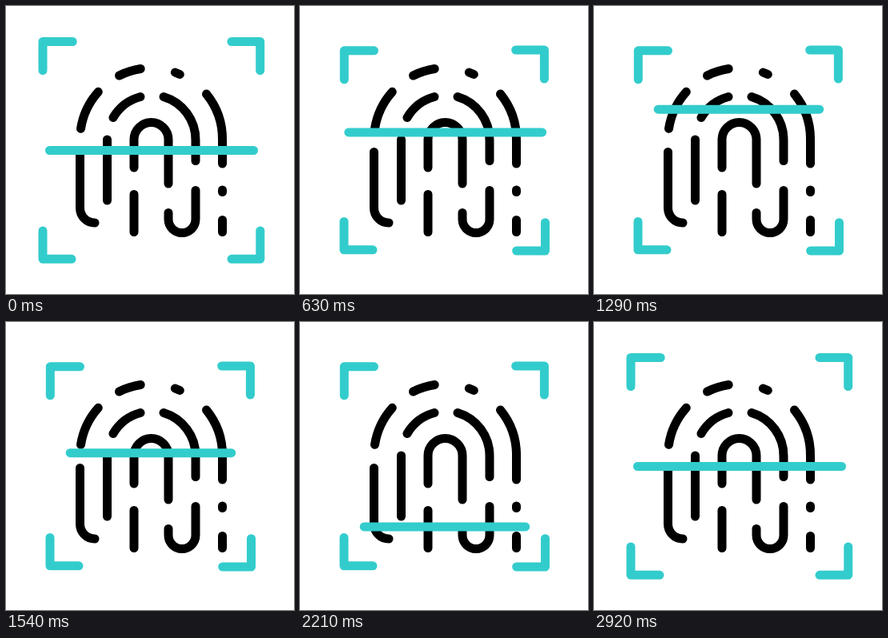
Write an HTML page that moves like this. It is 360x360 px and loops after 3 s.

```html
<!DOCTYPE html>
<html lang="en">
<head>
<meta charset="utf-8">
<title>Fingerprint scan</title>
<style>
  html, body { margin: 0; width: 100%; height: 100%; overflow: hidden; background: #fff; }
  svg { display: block; width: 100%; height: 100%; }
  path { fill: none; stroke-width: 11; stroke-linecap: round; stroke-linejoin: round; }
  .print { stroke: #000; }
  .frame, #beam { stroke: #33cccc; }
</style>
</head>
<body>
<svg viewBox="0 0 360 360">
  <path class="print" d="
    M141.5 87 A89.5 89.5 0 0 1 168.2 78.5
    M211.3 83 L217.3 85.5
    M115.3 107.3 A89.5 89.5 0 0 0 93.5 153.3
    M92.5 182.5 V252.5 A18.5 18.5 0 0 0 111 271
    M126.5 167 V243
    M134 139.5 A56 56 0 0 1 168 113.5
    M197 113.5 A56 56 0 0 1 237 168 V193.5
    M250.5 110 A89.5 89.5 0 0 1 270.5 168 V197
    M270.5 230 V232.5
    M270.5 267.5 V282.5
    M160 202 V167 A21.5 21.5 0 0 1 203 167 V222
    M160 235.5 V282.5
    M203 258.5 V266.5 A17 17 0 0 0 237 266.5 V230.5"/>
  <path class="frame" data-dx="9.3" data-dy="11.3" d="M83.2 44.5 H46 V80.5"/>
  <path class="frame" data-dx="-12.3" data-dy="10.5" d="M282 44.5 H317.7 V80.5"/>
  <path class="frame" data-dx="9" data-dy="-11.5" d="M46 281 V316.3 H82"/>
  <path class="frame" data-dx="-11.3" data-dy="-10.3" d="M282 316.3 H317.8 V281"/>
  <path id="beam" d="M54.5 180.5 H309.5"/>
</svg>
<script>
  const LOOP = 3000, STEPS = 72, LEAD = 5;
  const REST = 180.5, TOP = 88.8, BOTTOM = 273.2;
  const corners = document.querySelectorAll('.frame');
  const beam = document.getElementById('beam');

  const span = (n, a, b) => Math.min(1, Math.max(0, (n - a) / (b - a)));
  const mix = (a, b, p) => a + (b - a) * p;
  const easeOut = p => 1 - (1 - p) ** 1.55;
  const easeInOut = p => p < 0.5 ? 2 * p * p : 1 - 2 * (1 - p) ** 2;

  function draw(n) {
    const back = easeInOut(span(n, 61, 70));
    const close = easeInOut(span(n, 1, 13)) - back;
    const rise = easeOut(span(n, 14, 20));
    const scan = span(n, 24, 56);

    for (const c of corners) {
      c.setAttribute('transform', `translate(${c.dataset.dx * close} ${c.dataset.dy * close})`);
    }
    const narrow = rise - back;
    const y = mix(mix(mix(REST, TOP, rise), BOTTOM, scan), REST, back);
    beam.setAttribute('d', `M${54.5 + 25.7 * narrow} ${y} H${309.5 - 27.8 * narrow}`);
  }

  // The motion runs at 24 steps per second.
  function tick() {
    const t = (performance.now() + LEAD) % LOOP;
    draw(Math.floor(t / LOOP * STEPS));
    requestAnimationFrame(tick);
  }
  tick();
</script>
</body>
</html>
```
